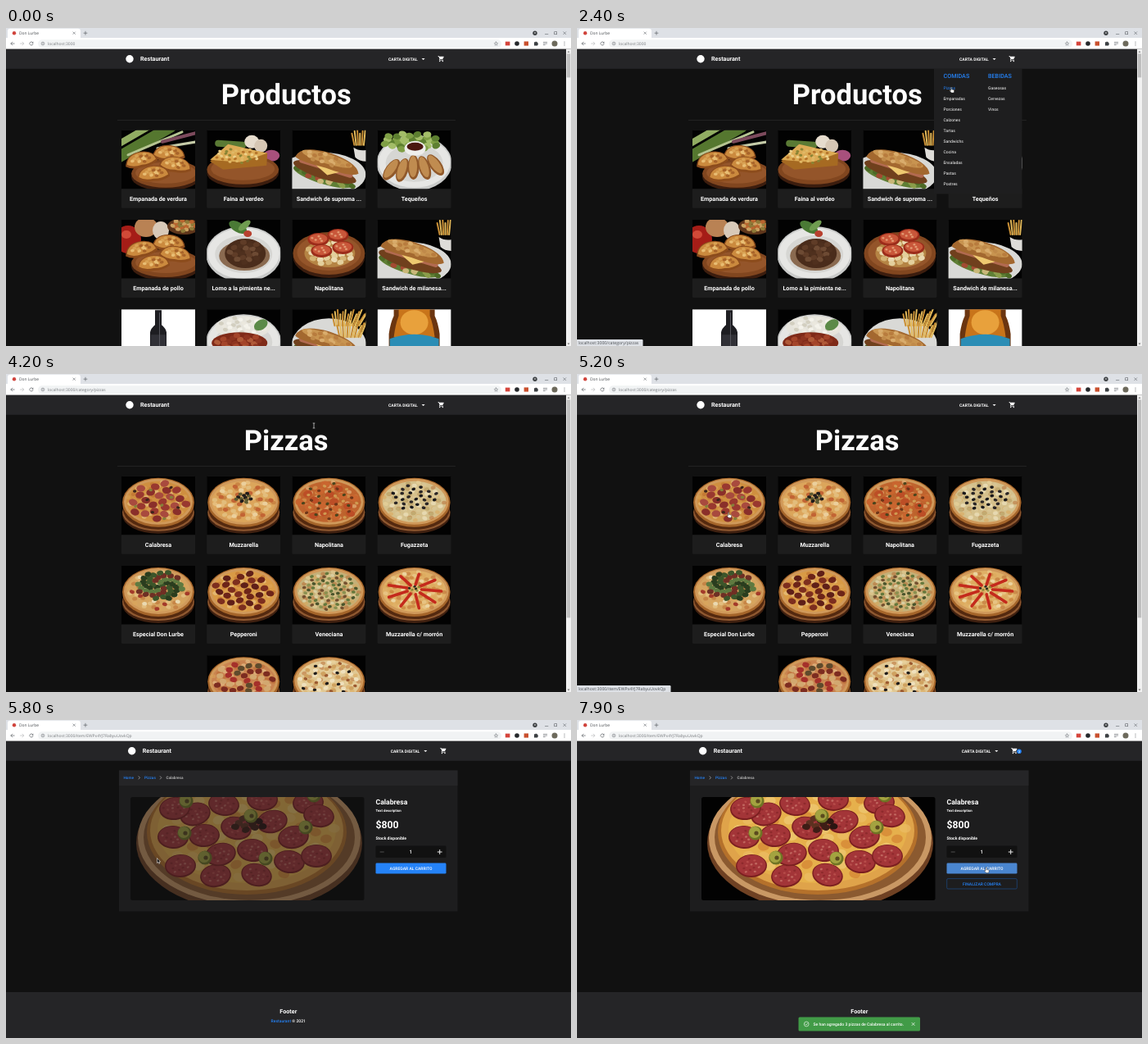
An HTML page for the animation above (8000 ms loop, 690 by 388 pixels).

```html
<!DOCTYPE html>
<html lang="es">
<head>
<meta charset="utf-8">
<title>Restaurant</title>
<style>
html, body { margin: 0; width: 100%; height: 100%; overflow: hidden; background: #111; }
svg { display: block; }
#stage { width: 100%; height: 100%; }
text { font-family: Roboto, sans-serif; text-rendering: geometricPrecision; white-space: pre; }
.ui { font-family: "Open Sans", "Noto Sans", sans-serif; }
</style>
</head>
<body>
<svg id="stage" viewBox="0 0 690 388"></svg>
<script>
const BLUE = '#2583f8', BAR = '#252527', SKEL = '#2f2f2f', SHIFT = 2.7;
const LOOP = 8000, STEP = 100;

// ---- drawing helpers ----
const rect = (x, y, w, h, fill, rx = 0, more = '') =>
  `<rect x="${x}" y="${y}" width="${w}" height="${h}" rx="${rx}" fill="${fill}" ${more}/>`;
const oval = (x, y, rx, ry, fill, rot = 0) =>
  `<ellipse cx="${x}" cy="${y}" rx="${rx}" ry="${ry}" fill="${fill}" transform="rotate(${rot} ${x} ${y})"/>`;
const dot = (x, y, r, fill) => oval(x, y, r, r, fill);
const shape = (d, fill) => `<path d="${d}" fill="${fill}"/>`;
const line = (d, color, w = 0.8) =>
  `<path d="${d}" fill="none" stroke="${color}" stroke-width="${w}" stroke-linecap="round"/>`;
const text = (x, y, s, size, fill = '#fff', weight = 700, anchor = 'start', more = '') =>
  `<text x="${x}" y="${y}" font-size="${size}" fill="${fill}" font-weight="${weight}" text-anchor="${anchor}" ${more}>${s}</text>`;
const mid = (x, y, s, size, fill, weight) => text(x, y, s, size, fill, weight, 'middle');
const ui = (x, y, s, size, fill, more = '') => text(x, y, s, size, fill, 400, 'start', 'class="ui" ' + more);
const group = (id, body) => `<g id="${id}">${body}</g>`;
const list = (n, fn) => Array.from({ length: n }, (_, i) => fn(i)).join('');

// Even spread of toppings over an ellipse
const spread = (n, x, y, rx, ry, size, colors, turn = 0) => list(n, i => {
  const r = Math.sqrt((i + 0.5) / n), a = i * 2.4 + turn;
  return oval((x + rx * r * Math.cos(a)).toFixed(1), (y + ry * r * Math.sin(a)).toFixed(1),
    size, size * 0.75, colors[i % colors.length], (i * 47) % 40 - 20);
});

// ---- dishes, each in a 90 x 72 box ----
const plate = (y = 44) => oval(45, y, 46, 34, '#c9cac9') + oval(45, y - 1, 44, 31, '#e6e6e4') + oval(45, y, 35, 23, '#d6d6d3');
const board = (x, y, rx, ry) => oval(x, y + 4, rx, ry, '#3c1d0e') + oval(x, y, rx, ry, '#81461f') + oval(x, y - 1, rx - 5, ry - 4, '#94552a');
const pastry = (x, y, rot) => `<g transform="translate(${x} ${y}) rotate(${rot})">` +
  shape('M-20 5Q-17-10 1-10Q18-9 20 4Q11 10 0 9Q-12 11-20 5Z', '#8c4c1c') +
  shape('M-18 3Q-15-9 1-9Q16-8 18 2Q9 7 0 6Q-11 8-18 3Z', '#cb8a3e') +
  spread(12, 0, -2, 13, 5, 2.4, ['#e8bd73', '#d9a355', '#a8642a']) + '</g>';
const pastries = () => board(54, 53, 42, 17) + pastry(58, 28, 4) + pastry(24, 36, -10) + pastry(66, 42, 10) + pastry(39, 53, -4);
const fries = (x, y, n = 7) => list(n, i => line(`M${x + i * 2.3} ${y + 14}l${i - 3} ${-14 - (i % 3) * 3}`, i % 2 ? '#e3b95a' : '#c98f35', 2));
const roll = () => `<g transform="rotate(17 42 44)">` +
  oval(42, 57, 38, 9, '#5f7f35') + spread(22, 42, 57, 38, 7, 4, ['#8a9c4a', '#4d6a26', '#a34a32', '#c9b878']) +
  oval(42, 51, 40, 9, '#70401d') + rect(8, 43, 68, 6, '#b26a50', 3) + shape('M20 42L66 42L46 54Z', '#eec970') +
  shape('M2 44Q4 28 40 27Q76 28 82 41Q76 48 42 46Q10 48 2 44Z', '#a3682f') + oval(40, 35, 32, 6, '#c89450') +
  spread(16, 40, 36, 30, 6, 3, ['#d9ac6c', '#b87c3e', '#c08a4a']) + '</g>';
const cup = () => fries(76, 4, 6) + shape('M75 21Q82 26 91 24V38Q82 38 77 33Z', '#dedcd8');
const leaves = (n, x, y, rx, ry) => spread(n, x, y, rx, ry, 5, ['#7f9f45', '#a3bd68', '#5d7f30']);

const dishes = {
  greens: () => line('M-2 32L60 -4', '#55772f', 14) + line('M-2 16L36 -6', '#91ac62', 8) + line('M8 30L74 2', '#b5c491', 3) +
    line('M50 14L92 3', '#7c4a5c', 4) + line('M44 22L92 14', '#c5cba8', 3) + pastries(),
  wedge: () => line('M14 16L44 18', '#5a7a34', 8) + oval(55, 14, 9, 8, '#e6dccd') + oval(66, 19, 8, 8, '#d6c7b4') + oval(79, 31, 10, 7, '#a8507c') +
    board(44, 48, 44, 18) + shape('M4 38L26 18L74 28L73 43L20 48Z', '#a66a22') + shape('M4 36L26 17L74 28L42 39Z', '#dcab55') +
    spread(34, 38, 31, 28, 9, 2, ['#8a8434', '#eccf88', '#b5742a', '#e0b866']),
  sandwich: () => oval(36, 54, 54, 27, '#d9d9d6') + cup() + roll(),
  sticks: () => plate(40) + leaves(34, 42, 14, 36, 11) +
    list(5, i => oval(17 + i * 13.5, 48 - i * 1.4 + (i % 2) * 2, 7, 15, '#91592a', 36 - i * 18) + oval(16.5 + i * 13.5, 47 - i * 1.4 + (i % 2) * 2, 5, 13, '#c08c50', 36 - i * 18)) +
    oval(46, 22, 13, 9, '#eeeeeb') + oval(46, 20, 10, 5, '#4a1710'),
  peppers: () => oval(8, 24, 16, 17, '#a51d17') + oval(6, 18, 6, 5, '#d14a38') + oval(30, 9, 14, 12, '#b98254') + oval(48, 13, 10, 11, '#d8c9b8') +
    oval(76, 8, 20, 10, '#5f361b') + spread(22, 76, 7, 15, 7, 3, ['#b9652f', '#8e7a38', '#c9a060']) + pastries(),
  steak: () => plate(42) + oval(46, 44, 31, 18, '#8a6a50') + oval(47, 41, 25, 18, '#4a2c1b') +
    spread(20, 47, 39, 20, 13, 4, ['#5f3c27', '#4f301e', '#6d4a33']) +
    oval(38, 9, 12, 6, '#4a7a35', 30) + oval(46, 7, 9, 4, '#6f9c50', -40) + oval(50, 17, 5, 4, '#b8402f'),
  tomato: () => board(45, 41, 44, 26) + oval(46, 41, 31, 17, '#b58444') + spread(30, 46, 40, 29, 15, 4, ['#e3cf9c', '#d4b374', '#ead9b0']) +
    [[32, 24], [56, 19], [62, 34], [36, 38]].map(([x, y]) => oval(x, y, 13, 8, '#9c2c1a') + oval(x, y - 1, 11, 6, '#c9573a') + spread(5, x, y - 1, 8, 4, 1.6, ['#e39a72'])).join(''),
  wine: () => rect(0, 0, 90, 72, '#fff') + shape('M41 1h8v18q5 4 6 9v44h-20v-44q1 -5 6 -9Z', '#1d1d21') +
    rect(36, 31, 18, 20, '#303036') + rect(46, 4, 1, 46, '#55555c'),
  rice: () => plate(40) + oval(44, 22, 34, 14, '#e6e4dc') + spread(30, 44, 20, 30, 10, 3, ['#f4f2ea', '#d3cfc0', '#ebe8de']) +
    oval(66, 19, 9, 6, '#5c8a48', -30) + oval(40, 41, 34, 13, '#7f2a18') + spread(20, 40, 40, 29, 9, 4, ['#a4452a', '#8e3520', '#b05a38']),
  combo: () => oval(45, 45, 46, 34, '#d9d9d6') + fries(52, 6, 14) + fries(58, 20, 12) + roll(),
  beer: () => rect(0, 0, 90, 72, '#fff') + shape('M20 0H70V8Q74 16 76 30V72H14V30Q16 16 20 8Z', '#6b3510') +
    shape('M26 0H64V8Q68 18 70 34H20Q22 18 26 8Z', '#c8741a') + oval(45, 16, 17, 15, '#e8a13c') + shape('M15 36Q45 25 75 36V72H15Z', '#2b8db5')
};

const pizza = (cheese, tops) => oval(45, 47, 44, 23, '#3f2010') + oval(45, 44, 44, 23, '#8f5830') + oval(45, 41, 43, 24, '#54290f') +
  oval(45, 32, 44, 30, '#a5652a') + oval(45, 31, 42, 28, '#d0995a') + oval(45, 31, 39, 25, cheese) +
  spread(60, 45, 31, 38, 24, 3, ['#f0d9a077', '#b5622a77', '#dca85a88']) + tops;
const over = (n, size, colors, turn) => spread(n, 45, 31, 36, 23, size, colors, turn);
const pizzas = {
  salami: () => pizza('#cf8f40', over(24, 5.4, ['#99382f', '#8a2f2a', '#a84a3e']) + over(10, 2.2, ['#85803a', '#3d241b'], 1)),
  cheese: () => pizza('#dca55c', over(40, 3.2, ['#ebcf9c', '#c26434', '#e2bd7c']) + spread(12, 45, 26, 11, 6, 2.6, ['#201c1a', '#5f5a30'])),
  tomato: () => pizza('#c0642e', over(18, 5.6, ['#bc4e26', '#c9652f']) + over(32, 2.2, ['#4b441c', '#cf9a50', '#6d3518'], 2)),
  onion: () => pizza('#d4c08c', over(50, 3, ['#e6d8b0', '#c2aa70', '#d8c594']) + spread(26, 45, 26, 30, 15, 2.4, ['#1b1a1c', '#2b2626'], 1)),
  rocket: () => pizza('#d5a460', over(22, 3, ['#ead9b0', '#a33a2a']) + spread(46, 47, 24, 29, 17, 4, ['#3c552a', '#2a3d1e', '#5f7a40', '#6f2f24'])),
  pepperoni: () => pizza('#d99a45', over(26, 4.8, ['#6d2418', '#7d2e1e', '#5f1f18'])),
  herbs: () => pizza('#c4b078', over(80, 2.4, ['#65783c', '#8b9150', '#d8cda0', '#4b552c', '#74502f'])),
  rays: () => pizza('#dfb066', over(30, 2.8, ['#ecd4a0', '#cf8d45']) +
    list(9, i => { const c = Math.cos(i * 0.698), s = Math.sin(i * 0.698); return line(`M${45 + c * 9} ${29 + s * 6}L${45 + c * 33} ${31 + s * 21}`, '#c42a1c', 3.6); }) +
    spread(6, 45, 28, 7, 4, 1.8, ['#2b2b1c', '#8a8a36'])),
  peppers: () => pizza('#c98350', over(36, 4.2, ['#a5302a', '#d2a870', '#7d2c20', '#5f4a2c'])),
  black: () => pizza('#e0c894', over(40, 3, ['#efe0bc', '#cfa260']) + over(18, 2.3, ['#1d1b1a', '#9c5a30'], 2))
};

const col = i => 141 + i * 104.2;
const card = (x, y, art, name) =>
  rect(x, y, 90, 95, '#1d1d1d', 1.5) + `<svg x="${x}" y="${y}" width="90" height="71.5" viewBox="0 0 90 71.5">${rect(0, 0, 90, 72, '#020202')}${art}</svg>` +
  mid(x + 45, y + 85.8, name, 7.19);
const divider = y => rect(136, y, 413, 0.6, '#2e2e2e');
const catalog = (title, items, arts) => mid(342.2, 93, title, 34.5) + divider(112.4) +
  items.map(([art, name], i) => {
    const c = items.length === 10 && i > 7 ? i - 7 : i % 4;
    return card(col(c), 124.8 + Math.floor(i / 4) * 109.2, arts[art](), name);
  }).join('');

const home = catalog('Productos', [
  ['greens', 'Empanada de verdura'], ['wedge', 'Faina al verdeo'], ['sandwich', 'Sandwich de suprema ...'], ['sticks', 'Tequeños'],
  ['peppers', 'Empanada de pollo'], ['steak', 'Lomo a la pimienta ne...'], ['tomato', 'Napolitana'], ['sandwich', 'Sandwich de milanesa...'],
  ['wine', ''], ['rice', ''], ['combo', ''], ['beer', '']], dishes);

const category = catalog('Pizzas', [
  ['salami', 'Calabresa'], ['cheese', 'Muzzarella'], ['tomato', 'Napolitana'], ['onion', 'Fugazzeta'],
  ['rocket', 'Especial Don Lurbe'], ['pepperoni', 'Pepperoni'], ['herbs', 'Veneciana'], ['rays', 'Muzzarella c/ morrón'],
  ['peppers', ''], ['black', '']], pizzas);

const ghosts = rect(297.5, 61.6, 89, 2.4, SKEL, 1) + divider(76.3) +
  list(12, i => {
    const x = col(i % 4), y = 88 + Math.floor(i / 4) * 119.3;
    return rect(x, y, 90, 90, SKEL) + rect(x + 9, y + 96, 72, 2.4, SKEL, 1);
  });

// ---- navigation ----
const cartPath = 'M7 18c-1.1 0-2 .9-2 2s.9 2 2 2 2-.9 2-2-.9-2-2-2zM1 2v2h2l3.6 7.6-1.35 2.45c-.16.28-.25.6-.25.95 0 1.1.9 2 2 2h12v-2H7.4c-.14 0-.25-.1-.25-.25l.03-.12.9-1.63h7.45c.75 0 1.4-.4 1.75-1.03l3.6-6.5A1 1 0 0 0 20 4H5.2l-.94-2H1zm16 16c-1.1 0-2 .9-2 2s.9 2 2 2 2-.9 2-2-.9-2-2-2z';
const nav = rect(-5, 25.6, 700, 24.2, BAR) + group('navIn',
  dot(151, 37.7, 4.7, '#fff') + text(164, 40.2, 'Restaurant', 7.19) +
  rect(464, 31, 51, 13, '#303032', 1.5, 'id="navHover"') + text(467, 39.6, 'CARTA DIGITAL', 5.03, '#fff', 600) +
  shape('M507.6 37h4l-2 2z', '#fff') +
  `<path d="${cartPath}" fill="#fff" transform="translate(527.2 33.4) scale(.359)"/>` +
  group('badge', dot(537.3, 38.2, 2.8, BLUE) + mid(537.3, 39.6, '3', 3.8, '#fff', 500)));

const links = (x, names) => names.map((s, i) =>
  text(x, 75.3 + i * 12.95, s, 5.03, '#fff', 400, 'start', s === 'Pizzas' ? 'id="pick"' : '')).join('');
const menu = rect(436, 50, 107.5, 152.5, '#1e1e1f') +
  text(447.5, 60.8, 'COMIDAS', 7.19, BLUE, 500) + text(502, 60.8, 'BEBIDAS', 7.19, BLUE, 500) +
  links(447.5, ['Pizzas', 'Empanadas', 'Porciones', 'Calzones', 'Tartas', 'Sandwichs', 'Cocina', 'Ensaladas', 'Pastas', 'Postres']) +
  links(502, ['Gaseosas', 'Cervezas', 'Vinos']);

// ---- product page ----
const slices = [[231, 115], [266, 103], [313, 97], [369, 101], [325, 124], [382, 117], [204, 143], [242, 141], [351, 143], [281, 132],
  [301, 159], [213, 178], [256, 190], [306, 189], [346, 173], [379, 166], [206, 108], [262, 164]];
const olives = [[220, 99], [218, 138], [299, 117], [366, 131], [243, 168], [317, 169], [376, 92]];
const photo = `<clipPath id="frame">${rect(152, 94, 285.5, 126, '#000', 2.5)}</clipPath><g clip-path="url(#frame)">` +
  rect(152, 94, 286, 126, '#020202') + oval(297, 150, 138, 83, '#6f4123') + oval(297, 144, 136, 82, '#c99864') + oval(297, 143, 129, 77, '#8b5a30') +
  oval(294, 137, 122, 76, '#b5712b') + oval(294, 135, 118, 73, '#dfa34a') + oval(294, 134, 109, 65, '#e6b04c') +
  spread(90, 294, 134, 107, 64, 7, ['#f0cf7d99', '#cf752b88', '#edc06a99']) +
  slices.map(([x, y], i) => {
    const rot = (i * 23) % 30 - 15;
    return oval(x, y, 19, 14, '#7b1f20', rot) + oval(x, y - 0.6, 17.5, 12.6, '#a33538', rot) +
      spread(14, x, y, 14, 9, 1.6, ['#c0665e', '#8e2a2c', '#b84d4a'], i);
  }).join('') +
  spread(10, 297, 127, 19, 9, 5, ['#3e1d16', '#5d3020', '#2b1512']) +
  olives.map(([x, y]) => dot(x, y, 8.6, '#6f7424') + dot(x - 1, y - 1, 7, '#a3a340') + dot(x + 1, y, 2.6, '#5b4a1e')).join('') + '</g>';
const footer = rect(0, 332, 690, 56, BAR) + mid(344.8, 358, 'Footer', 7.19) +
  text(323.6, 369, `<tspan fill="${BLUE}" font-weight="500">Restaurant</tspan> ® 2021`, 5.03, '#fff', 500);
const chevron = x => line(`M${x - 0.7} 68.8l1.5 1.6l-1.5 1.6`, '#bbb', 0.7);
const item = rect(138, 61.5, 413.5, 172, '#1d1d1e') + rect(138, 61.5, 413.5, 18.5, BAR) +
  text(143.5, 72.1, 'Home', 4.67, BLUE, 500) + chevron(162.7) + text(169, 72.1, 'Pizzas', 4.67, BLUE, 500) + chevron(189) +
  text(195.5, 72.1, 'Calabresa', 4.67, '#c4c4c4', 500) + group('photo', photo) +
  text(451.5, 103, 'Calabresa', 8.63) + text(451.5, 111.6, 'Text description', 4.31) +
  text(451.5, 131.8, '$800', 12.22) + text(451.5, 145.9, 'Stock disponible', 5.03) +
  rect(451.5, 153.6, 86, 14.4, '#111', 1.2) + `<path id="minus" d="M456.7 161h5" stroke-width=".9"/>` +
  text(494.2, 163.3, '1', 6.2, '#fff', 500, 'middle', 'id="qty"') + line('M527.2 161h5M529.7 158.5v5', '#fff', 0.9) +
  rect(451.5, 174.6, 86, 13, BLUE, 1.4, 'id="add"') + mid(494.5, 182.9, 'AGREGAR AL CARRITO', 5.03, '#fff', 500) +
  group('finish', rect(451.7, 193.6, 85.6, 12.4, 'none', 1.4, 'stroke="#1d5cae" stroke-width=".5"') +
    mid(494.5, 201.6, 'FINALIZAR COMPRA', 5.03, BLUE, 500));
const toast = rect(270.5, 362.4, 148.5, 17.2, '#419b47', 1.5) +
  `<circle cx="280.2" cy="371" r="2.9" fill="none" stroke="#fff" stroke-width=".6"/>` + line('M278.9 371l1 1.1l2-2.2', '#fff', 0.6) +
  text(288.5, 372.7, 'Se han agregado 3 pizzas de Calabresa al carrito.', 5.03, '#fff', 500) +
  line('M409 369.4l3.2 3.2M412.2 369.4l-3.2 3.2', '#fff', 0.7);

// ---- browser window ----
const gray = '#5f6368';
const browser = rect(0, 0, 690, 12.5, '#dee1e6') + rect(2, 0.8, 89, 14, '#fff', 3) + rect(0, 12, 690, 13.6, '#fff') +
  dot(10, 6.2, 2.2, '#d0433c') + ui(16, 8, 'Don Lurbe', 4.9, '#45494d') +
  line('M81.9 4.9l2.6 2.6M84.5 4.9l-2.6 2.6', gray, 0.6) + line('M95 6.2h4M97 4.2v4', gray, 0.7) +
  dot(646, 6.2, 2.7, '#3c4043') + shape('M644.8 5.6h2.4l-1.2 1.5z', '#fff') +
  line('M658.5 7.5h3.4M680.8 4.7l3 3M683.8 4.7l-3 3', gray, 0.6) + rect(669.7, 4.7, 3, 3, 'none', 0, `stroke="${gray}" stroke-width=".6"`) +
  line('M10.2 19h-4.2M7.8 17.1l-1.9 1.9l1.9 1.9', gray, 0.7) + line('M17.5 19h4.2M19.9 17.1l1.9 1.9l-1.9 1.9', '#babcbe', 0.7) +
  line('M32.6 17.6a2.1 2.1 0 1 0 .4 2', gray, 0.7) + shape('M33.3 16.6v2h-2z', gray) +
  rect(39, 14.2, 566, 9.8, '#f1f3f4', 4.9) + `<circle cx="45" cy="19" r="1.9" fill="none" stroke="${gray}" stroke-width=".5"/>` + line('M45 18.8v1M45 17.9v.1', gray, 0.5) +
  ui(51, 20.8, '', 4.95, '#777a7e', 'id="url"') +
  line('M598.5 16.9l.7 1.4l1.5.2l-1.1 1.1l.3 1.5l-1.4-.7l-1.4.7l.3-1.5l-1.1-1.1l1.5-.2z', gray, 0.5) +
  rect(609.8, 16.6, 5.6, 4.8, '#d5453c') + dot(624, 19, 2.8, '#26282b') + rect(632.6, 16.4, 5.4, 5.2, '#c9502e') +
  shape('M645 17.3h1.4a.8 .8 0 0 1 1.6 0h1.3v1.4a.8 .8 0 0 1 0 1.6v1.2h-4.3z', '#3c4043') +
  line('M656.3 17.3h4.4M656.3 19h4.4M656.3 20.7h2', gray, 0.6) + dot(670, 19, 3.5, '#6d6a5c') +
  [17, 19, 21].map(y => dot(682, y, 0.55, gray)).join('');
const scrollbar = rect(684, 25.6, 6, 362.4, '#f1f1f1') + rect(684.8, 31.4, 4.4, 30, '#bfbfbf', 0, 'id="thumb"') +
  shape('M685.5 29.7h3l-1.5-1.8z', '#777') + shape('M685.5 384.6h3l-1.5 1.8z', '#777');
const status = rect(-2, 380, 82, 10, '#dee1e6', 1.2, 'id="tipBox"') + ui(1.6, 385.9, '', 5.15, '#4b4f54', 'id="tip"');

const hand = 'M0 .4Q.6-.3 1.1.4V3L3.6 3.5Q4.3 3.7 4.2 4.6L3.7 7H.7L-1.4 4.4Q-1.2 3.6-.5 4L0 4.4Z';
const pointers = `<path id="arrow" d="M0 0V6L1.4 4.8L2.3 6.9L3.2 6.5L2.3 4.5H4.1Z" fill="#111" stroke="#fff" stroke-width=".5"/>` +
  `<path id="hand" d="${hand}" fill="#fff" stroke="#111" stroke-width=".4"/>` +
  `<path id="beam" d="M-1.3 0H1.3M0 0V6M-1.3 6H1.3" stroke="#ddd" stroke-width=".7"/>`;

document.getElementById('stage').innerHTML = rect(0, 0, 690, 388, '#111') +
  group('home', home) + group('ghosts', ghosts) + group('category', category) +
  group('itemGhost', rect(138, 61.5, 413.5, 172, SKEL)) + group('item', item) + group('footer', footer) +
  nav + group('menu', menu) + group('scrollbar', scrollbar) + browser +
  group('status', status) + group('toast', toast) + group('cursor', pointers);

// ---- timeline ----
const host = 'localhost:3000', pizzaUrl = host + '/category/pizzas', itemUrl = host + '/item/EWPx4YJ7RabyuUovkQp';
const pages = [[0, 'home'], [3300, 'ghosts'], [3700, 'category'], [5300, 'itemGhost'], [5700, 'item']];
const urls = [[0, host], [2500, pizzaUrl], [5700, itemUrl]];
const tips = [[0, ''], [2400, pizzaUrl], [3700, ''], [5200, itemUrl], [5800, '']];
const counts = [[0, 1], [7100, 2], [7300, 3], [7700, 1]];
const kinds = [[0, ''], [100, 'arrow'], [1900, 'hand'], [3700, 'arrow'], [4100, 'beam'], [4400, 'arrow'], [4700, 'hand'], [5300, 'arrow'], [6700, 'hand']];
const path = [[100, 640, 300], [900, 530, 60], [1300, 499, 33], [1600, 499, 33], [1900, 462, 66], [2100, 456.5, 72], [3700, 456.5, 72],
  [4200, 376, 60], [4600, 300, 104], [5000, 184.5, 168.5], [6000, 184.5, 168.5], [6300, 330, 120], [6500, 500, 86], [6600, 545, 125],
  [6800, 533.5, 161], [7300, 533.5, 161], [7500, 499, 179.5], [8000, 499, 179.5]];
const menuFade = [[1400, 0], [1700, 1], [3200, 1], [3300, 0.6], [3500, 0]];
const photoFade = [[5600, 0], [6000, 1]];
const toastFade = [[7600, 0], [7900, 1]];

const at = (table, t) => table.reduce((v, row) => row[0] <= t ? row[1] : v, table[0][1]);
function tween(table, t, k = 1) {
  const i = table.findIndex(row => row[0] > t);
  if (i === 0) return table[0][k];
  if (i < 0) return table[table.length - 1][k];
  const a = table[i - 1], b = table[i];
  return a[k] + (b[k] - a[k]) * (t - a[0]) / (b[0] - a[0]);
}
const el = id => document.getElementById(id);
const set = (id, name, value) => el(id).setAttribute(name, value);
const show = (id, on) => { el(id).style.display = on ? '' : 'none'; };

function draw(t) {
  const page = at(pages, t), wide = page.startsWith('item'), tip = at(tips, t), n = at(counts, t), kind = at(kinds, t);
  pages.forEach(([, id]) => show(id, id === page));
  show('footer', wide);
  show('scrollbar', !wide);
  set('thumb', 'height', page === 'home' ? 29 : 266);
  set('navIn', 'transform', `translate(${wide ? SHIFT : 0} 0)`);
  show('navHover', t >= 1200 && t < 1700);
  set('menu', 'opacity', tween(menuFade, t));
  set('pick', 'fill', t >= 2000 ? BLUE : '#fff');
  el('url').textContent = at(urls, t);
  show('status', tip);
  el('tip').textContent = tip;
  set('tipBox', 'width', tip === itemUrl ? 116.5 : 82.5);
  set('photo', 'opacity', tween(photoFade, t));
  el('qty').textContent = n;
  set('minus', 'stroke', n > 1 ? '#fff' : '#555');
  set('add', 'fill', t >= 7500 ? '#4a86d0' : BLUE);
  show('finish', t >= 7700);
  show('badge', t >= 7700);
  set('toast', 'opacity', tween(toastFade, t));
  ['arrow', 'hand', 'beam'].forEach(id => show(id, id === kind));
  set('cursor', 'transform', `translate(${tween(path, t)} ${tween(path, t, 2)})`);
}

const start = performance.now();
let last = -1;
function tick() {
  const t = Math.floor((performance.now() - start) % LOOP / STEP) * STEP;
  if (t !== last) draw(last = t);
  requestAnimationFrame(tick);
}
tick();
</script>
</body>
</html>
```
